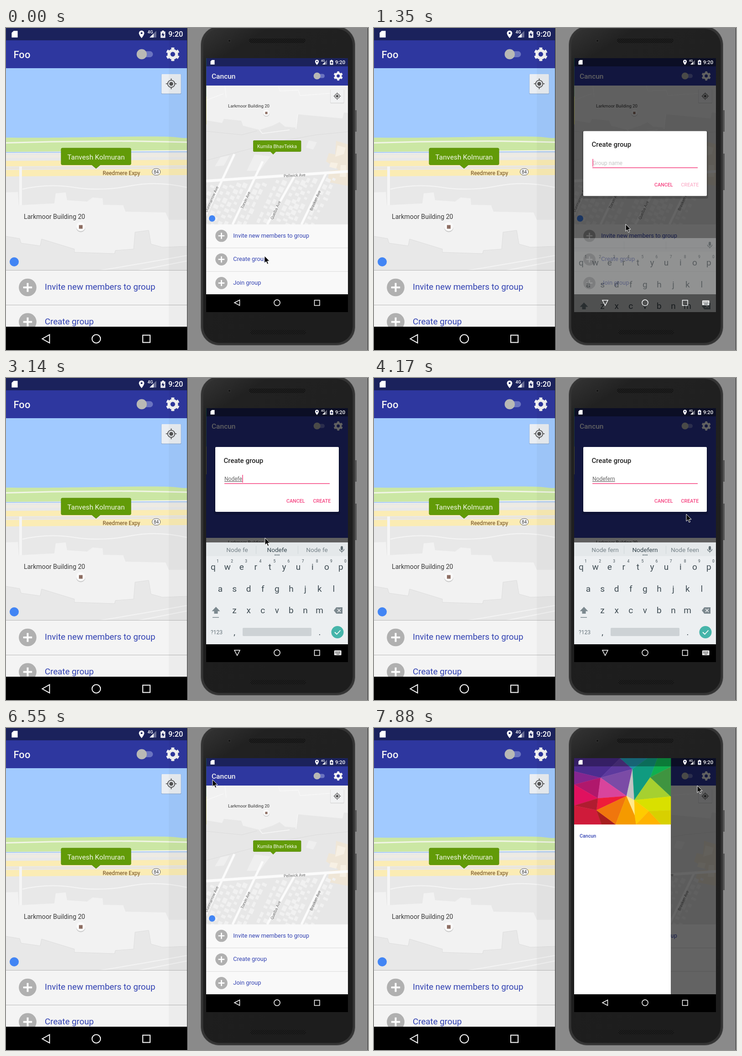
Animation of 794 by 705 pixels, one loop 8000 ms. Source, as an HTML page:

```html
<!DOCTYPE html>
<html lang="en">
<head>
<meta charset="utf-8">
<title>Create group demo</title>
<style>
html, body { margin: 0; width: 100%; height: 100%; overflow: hidden; background: #8a8a8a; }
svg { display: block; font-family: Roboto, sans-serif; }
.mid { text-anchor: middle; }
.medium { font-weight: 500; }
.link { fill: #3242b2; }
.line { fill: none; stroke: #fff; }
.street { fill: #6a6a6a; font-size: 8.6px; text-anchor: middle; }
</style>
</head>
<body>
<svg width="794" height="705" viewBox="0 0 794 705">
<defs>
  <clipPath id="screen"><rect x="439" y="66" width="311" height="556"/></clipPath>
  <clipPath id="mapArea"><rect x="439" y="126" width="311" height="304"/></clipPath>
  <clipPath id="strip"><rect x="439" y="350" width="311" height="12"/></clipPath>
  <clipPath id="leftMap"><rect y="88" width="397" height="443"/></clipPath>
  <pattern id="mesh" width="4" height="4" patternUnits="userSpaceOnUse">
    <rect width="4" height="4" fill="#0c0c0c"/><path d="M0 0h2v2H0zM2 2h2v2H2z" fill="#262626"/>
  </pattern>
  <linearGradient id="body" x2=".3" y2="1">
    <stop stop-color="#343434"/><stop offset=".12" stop-color="#212121"/><stop offset="1" stop-color="#1d1d1d"/>
  </linearGradient>
  <!-- Both icon groups are placed relative to the right end of the status bar. -->
  <g id="status" fill="#fff">
    <path d="M-68-5.5a4 4 0 0 1 4 4q0 2.5-4 7.5q-4-5-4-7.5a4 4 0 0 1 4-4z"/>
    <circle cx="-68" cy="-1.5" r="1.4" fill="#1b225c"/>
    <text x="-59" y="-1" font-size="6.5" class="medium">4G</text>
    <path d="M-46-5V5h-10z" opacity=".35"/><path d="M-50-1V5h-6z"/>
    <path d="M-39.5-4h2v-1.300h3V-4h2V5.500h-7z"/>
    <path d="M-35.500-3l-2.800 4.500h2v3l2.800-4.500h-2z" fill="#1b225c"/>
    <text x="-28" y="4" font-size="11.200" class="medium">9:20</text>
  </g>
  <path id="sd" d="M-1.500-5H4.500V5h-9V-2z" fill="#fff"/>
  <g id="tools">
    <rect x="-73" y="25.500" width="22" height="9" rx="4.500" fill="#6b74c0"/>
    <circle cx="-67.800" cy="30" r="7.600" fill="#b9b9b5"/>
    <g transform="translate(-21.300 30)" fill="none" stroke="#f4f4f4">
      <circle r="5.700" stroke-width="4.400"/>
      <circle r="8.600" stroke-width="3.200" pathLength="6" stroke-dasharray=".5" stroke-dashoffset="-.25"/>
    </g>
    <g transform="translate(-23.600 74.200)">
      <rect x="-15" y="-14.500" width="30" height="30" rx="1" fill="#777" opacity=".3"/>
      <rect x="-14.500" y="-14.500" width="29" height="29" rx="1" fill="#f6f7f8" opacity=".88"/>
      <circle r="5.300" fill="none" stroke="#555" stroke-width="1.200"/>
      <circle r="2.900" fill="#555"/>
      <path d="M0-8v3M0 8v-3M-8 0h3M8 0h-3" stroke="#555" stroke-width="1.200"/>
    </g>
  </g>
  <g id="map">
    <rect x="439" y="126" width="312" height="304" fill="#e7e7e7"/>
    <path d="M439 126H751V186L741 185 738 198 640 189 635 218 612 216 600 206 584 214 556 223 520 214 516 203 478 199 474 208 439 202z" fill="#f1f1f1"/>
    <path d="M480 126l3 26M597 126l4 12 40-2 4 12 66-5M439 158l38-14M556 223l6 8 60-8M640 189l-4 32" fill="none" stroke="#f8f8f8" stroke-width="1.500"/>
    <path d="M439 290L590 250 680 234 751 227M439 226l78 8 34-9" fill="none" stroke="#dcdcdc"/>
    <path d="M545 277l35 4-23 31-29 1zM470 283l20-4-12 22-20 2zM664 246l18 4-8 16-16-4z" fill="#efefef"/>
    <path d="M724 247l27 8V346l-46-9 4-24 20-3-27-18 6-18 14 3z" fill="#efe6d7"/>
    <path d="M727 257l18 5-4 14-19 6zM712 294l16 2-4 12-15-4zM734 300h12v26h-14z" fill="#f7f0e4"/>
    <g id="houses" fill="#f1f1f1"></g>
    <path d="M501 276L428 430M563 292L497 430M634 322L573 430M702 318L648 430" stroke="#fbfbfb" stroke-width="5"/>
    <path d="M439 335L751 314" stroke="#fbfbfb" stroke-width="6"/>
    <text class="street" x="633" y="325.500" transform="rotate(-3 633 325)">Pellwick Ave</text>
    <g id="streets"></g>
    <text x="487" y="174" font-size="9.600" fill="#333">Larkmoor Building 20</text>
    <circle cx="571" cy="187" r="7" fill="#c9c9c9"/><circle cx="571" cy="185.500" r="7" fill="#fafafa"/>
    <rect x="568.500" y="183.500" width="5" height="5" fill="#8d6e63"/>
    <circle cx="452" cy="417" r="7" fill="#4285f4"/>
    <path d="M542.500 248q0-1.500 1.500-1.500H645.500q1.500 0 1.500 1.500V269q0 1.500-1.500 1.500H592L586 276.500 580 270.500H544q-1.500 0-1.500-1.500z" fill="#629b08" stroke="#568a08" stroke-width=".8"/>
    <text class="mid" x="594.500" y="262.500" font-size="10.700" fill="#f3f8ea">Kumila BhavTekka</text>
  </g>
</defs>

<!-- Left device -->
<rect width="397" height="27" fill="#1b225c"/>
<rect y="27" width="397" height="61" fill="#2e379f"/>
<text class="medium" x="16.500" y="66" font-size="22" fill="#f4f4f4">Foo</text>
<g clip-path="url(#leftMap)">
  <rect y="88" width="397" height="443" fill="#e8e8e8"/>
  <rect y="88" width="397" height="160" fill="#a1caff"/>
  <path d="M0 240C120 241 210 238 300 237.500S370 241 397 241V268L0 272z" fill="#cbe7a4"/>
  <path d="M0 251.500L100 249 270 247.500 397 250" fill="none" stroke="#f1f5e6" stroke-width="3"/>
  <path d="M0 273L397 269" stroke="#f3f3f3" stroke-width="3.500"/>
  <path d="M0 272.500L397 271" stroke="#8fbdf5" stroke-width="1.500"/>
  <path d="M0 281L397 279" stroke="#eeebe3" stroke-width="7"/>
  <path d="M0 297L397 294.500" stroke="#fbecb4" stroke-width="12"/>
  <path d="M0 318L397 315" stroke="#fbecb4" stroke-width="14"/>
  <path d="M0 307L397 304.500" stroke="#ece6d6" stroke-width="3"/>
  <path d="M32 303V390" stroke="#f5f5f5" stroke-width="6"/>
  <path d="M36 353Q90 340 150 349T270 346 397 349" fill="none" stroke="#f5f5f5" stroke-width="2"/>
  <path d="M0 360L26 359 28 388 106 384 109 362 131 360 134 377 178 380 190 371 212 373 213 387 257 388 262 402 350 404 357 420H397V478L343 480 318 473 313 443 283 447 280 484 240 487 238 494 150 491V484L78 462 75 477 33 471 30 461 0 456z" fill="#f2f2f2"/>
  <path d="M0 456L30 461 33 471 75 477 78 462 150 484V491L238 494 240 487 280 484 283 447 313 443 318 473 343 480 397 478" fill="none" stroke="#dedede"/>
  <path d="M205 531L300 515 397 498M290 531l107-21" fill="none" stroke="#f4f4f4" stroke-width="2"/>
  <text x="212" y="321.500" font-size="12" fill="#6f4a1c">Reedmere Expy</text>
  <rect x="320.500" y="308" width="18" height="14" rx="7" fill="#fff" stroke="#555"/>
  <text class="mid" x="329.500" y="319" font-size="10" fill="#333">84</text>
  <text x="39" y="417.500" font-size="14.200" fill="#3a3a3a">Larkmoor Building 20</text>
  <circle cx="164" cy="437" r="10" fill="#c9c9c9"/><circle cx="164" cy="435" r="10" fill="#fafafa"/>
  <rect x="160" y="431.500" width="8" height="8" fill="#8d6e63"/>
  <circle cx="18" cy="512" r="10" fill="#4285f4"/>
  <path d="M121 265.500q0-2.500 2.500-2.500H271.500q2.500 0 2.500 2.500V297q0 2.500-2.500 2.500H207L197.500 307.500 188 299.500H123.500q-2.500 0-2.500-2.500z" fill="#629b08" stroke="#568a08"/>
  <text class="mid" x="197.500" y="287.500" font-size="15.300" fill="#f3f8ea">Tanvesh Kolmuran</text>
</g>
<use href="#sd" transform="translate(19 13.500) scale(1.465)"/>
<use href="#status" transform="translate(397 13.500) scale(1.465)"/>
<use href="#tools" transform="translate(397 13.500) scale(1.465)"/>
<rect y="530" width="397" height="124" fill="#f4f4f4"/>
<path d="M0 530.500H397M0 606.500H397" stroke="#b8b8b8"/>
<g id="leftRows"></g>
<path d="M357 27H397V654H357zM371 27H397V654H371zM382 27H397V654H382zM391 27H397V654H391z" opacity=".03"/>
<rect y="654" width="397" height="51"/>
<g class="line" stroke-width="2">
  <path d="M79.500 680.500L95.500 671.500V689.500z"/><circle cx="198" cy="680.500" r="9.300"/>
  <rect x="300" y="672.500" width="16" height="16"/>
</g>

<!-- Right device -->
<rect x="397" width="397" height="705" fill="#8a8a8a"/>
<path d="M397.500 0V705M793.500 0V705" stroke="#333"/>
<path d="M764 180h5v47h-5zM764 275h5v80h-5z" fill="#525252"/>
<rect x="427.500" y="-3.500" width="338" height="698" rx="40" fill="#343434" stroke="#555"/>
<rect x="432.500" y="1.500" width="328" height="688" rx="36" fill="url(#body)"/>
<rect x="533" y="23" width="124" height="10" rx="5" fill="url(#mesh)"/>
<rect x="536" y="661" width="122" height="10" rx="5" fill="url(#mesh)"/>
<circle cx="490" cy="28" r="4" fill="#2c2c2c"/><circle cx="490" cy="28" r="1.800" fill="#0e0e0e"/>
<g clip-path="url(#screen)">
  <rect x="439" y="66" width="312" height="18" fill="#1b225c"/>
  <rect x="439" y="84" width="312" height="42" fill="#2e379f"/>
  <text class="medium" x="451" y="111" font-size="15.500" fill="#f4f4f4">Cancun</text>
  <use href="#map" clip-path="url(#mapArea)"/>
  <use href="#tools" x="750" y="75"/>
  <rect x="439" y="430" width="312" height="153" fill="#f9f9f9"/>
  <path d="M439 481.500H751M439 533H751" stroke="#dadada"/>
  <g id="rightRows"></g>
  <g id="resized">
    <rect x="439" y="126" width="312" height="224" fill="#2e379f"/>
    <g clip-path="url(#strip)"><use href="#map" y="189"/></g>
  </g>
  <rect id="dim" x="439" y="66" width="312" height="517"/>
  <g id="dialog">
    <rect x="456" y="0" width="277" height="148" rx="4" opacity=".15"/>
    <rect x="459" width="271" height="142" rx="2" fill="#fff"/>
    <text class="medium" x="477.500" y="34.500" font-size="15" fill="#212121">Create group</text>
    <text id="hint" x="479.500" y="74" font-size="12" fill="#c4c4c4">Group name</text>
    <text id="input" x="479" y="74" font-size="12" fill="#666"></text>
    <rect x="479" y="79.500" width="231" height="1.500" fill="#f5417f"/>
    <rect id="caret" y="61" width="1.500" height="17" fill="#f5417f"/>
    <g class="medium" font-size="10.700" fill="#f5417f">
      <text x="615" y="121.500">CANCEL</text><text id="create" x="673.500" y="121.500">CREATE</text>
    </g>
  </g>
  <g id="drawer">
    <rect x="439" y="66" width="212" height="517" fill="#fff"/>
    <g id="art"></g>
    <rect x="439" y="66" width="212" height="18" opacity=".3"/>
    <text class="medium link" x="451" y="239.500" font-size="10.700">Cancun</text>
  </g>
  <rect x="439" y="583" width="312" height="39"/>
  <g class="line" stroke-width="1.500">
    <path id="back" d="M-6 0L5.500-6V6z"/><circle cx="594.500" cy="601.500" r="6.500"/>
    <rect x="676.500" y="596" width="11.500" height="11.500"/>
  </g>
  <g id="imeIcon">
    <rect x="720" y="596.500" width="15.500" height="10.500" rx="1" fill="#fff"/>
    <path d="M722 599.500h12M722 602h12" stroke="#000" stroke-width="1.300" stroke-dasharray="1.400 1"/>
    <path d="M724.500 604.800h7" stroke="#000"/>
  </g>
  <g id="keyboard">
    <rect x="439" y="360" width="312" height="223" fill="#eceff1"/>
    <rect x="439" y="360" width="312" height="30" fill="#e4e8ea"/>
    <path d="M548.500 367v18M640.500 367v18" stroke="#cfd5d8"/>
    <g id="words" class="mid" font-size="13.600" fill="#78848a">
      <text x="507" y="381"></text><text x="594.500" y="381" fill="#37474f"></text><text x="682" y="381"></text>
    </g>
    <path id="dots" d="M589.500 386.500h2v2h-2zM593.500 386.500h2v2h-2zM597.500 386.500h2v2h-2z" fill="#37474f"/>
    <rect x="734" y="368" width="5" height="9" rx="2.500" fill="#5f6c72"/>
    <path d="M731.500 374.500a5 5 0 0 0 10 0M736.500 379.500v3" fill="none" stroke="#5f6c72" stroke-width="1.300"/>
    <g id="keys" class="mid" font-size="19" fill="#3f4c53"></g>
    <path d="M460.500 501l9 9.500h-5v5.500h-8v-5.500h-5zM453 523.500h14v1.500h-14z" fill="#7c898f"/>
    <path d="M719 509l5.500-7H738V516H724.500z" fill="#7c898f"/>
    <path d="M727 505.500l7 7M734 505.500l-7 7" stroke="#eceff1" stroke-width="1.500"/>
    <text class="mid" x="462" y="560.500" font-size="12" fill="#66747b">?123</text>
    <rect x="519" y="547" width="151" height="18" rx="2" fill="#cdd2d5"/>
    <circle cx="727" cy="556.500" r="13.500" fill="#46b5aa"/>
    <path d="M721 556.500l4.500 4.500 8-8.500" class="line" stroke-width="1.800"/>
  </g>
  <use href="#sd" x="453" y="75"/>
  <use href="#status" x="750" y="75"/>
</g>
<path id="cursor" d="M0 0V15.500L3.600 12.200 6 18 8.600 17 6.200 11.300H11z" stroke="#fff"/>
</svg>
<script>
const $ = id => document.getElementById(id);
const LOOP = 8000, STEP = 148.5, WORD = 'Nodefern';

function listRow(x, y, scale, label) {
  return `<g transform="translate(${x} ${y}) scale(${scale})">
    <circle r="13.300" fill="#b0b0b0"/>
    <path d="M-6.700 0H6.700M0-6.700V6.700" stroke="#fff" stroke-width="2.700"/>
    <text class="link" x="25.800" y="3.700" font-size="12.900">${label}</text></g>`;
}
const labels = ['Invite new members to group', 'Create group', 'Join group'];
$('rightRows').innerHTML = labels.map((s, i) => listRow(472.5, 455 + i * 51.7, 1, s)).join('');
$('leftRows').innerHTML = labels.slice(0, 2).map((s, i) => listRow(47.5, 568 + i * 75.5, 1.455, s)).join('');

const streets = [['Dunmarrow Ave', 454, 376], ['Torvin Ave', 528, 378], ['Quelba Ave', 594, 400], ['Brasken Ave', 681, 379]];
$('streets').innerHTML = streets.map(([name, x, y]) =>
  `<text class="street" transform="translate(${x} ${y}) rotate(-66)">${name}</text>`).join('');

let seed = 7;
const random = () => (seed = seed * 16807 % 2147483647) / 2147483647;
let houses = '';
for (const x of [474, 546, 632, 700])
  for (const side of [-28, -14, 14, 28])
    for (let d = 14; d < 115; d += 14) {
      const w = 6 + random() * 5, h = 5 + random() * 7;
      const y = 335 - (x - 439) * .0675 + d;
      houses += `<rect width="${w}" height="${h}" transform="translate(${x - d * .478 + side - 4} ${y - 4}) rotate(25)"/>`;
    }
$('houses').innerHTML = houses;

let keys = '';
['qwertyuiop', 'asdfghjkl', 'zxcvbnm'].forEach((row, r) => [...row].forEach((c, i) => {
  const x = [454.5, 470, 501][r] + i * 31.1;
  keys += `<text x="${x}" y="${420 + r * 47.5}">${c}</text>`;
  if (!r) keys += `<text x="${x + 10}" y="404" font-size="8.500">${(i + 1) % 10}</text>`;
}));
$('keys').innerHTML = keys + '<text x="501" y="563">,</text><text x="688" y="563">.</text>';

// Low-poly drawer header: lettered corners, then faces as corner letters and a colour.
const corners = `439,66 540,66 567,90 497,109 439,95 554,149 439,124 491,154 439,170 488,180 439,211 499,211 530,211
  572,191 575,211 571,158 600,66 622,66 606,108 651,66 651,85 651,150 603,182 630,211 651,211 651,180`.split(/\s+/);
const faces = `abde#4c2d90 bcd#5d3a9e cdf#7b4ba6 edg#84268f gdh#b0186c dfh#d9449c ghi#e0115f hfj#ee1c3a
  ihj#b01c30 ijlk#cf1b3a jml#a81e1e jfm#f0760d fnom#f59a00 cpf#c4c4c4 fpn#ffe98a bqc#1f8fa8
  cqrsp#109b80 rtus#10b050 svp#a6d030 uvs#3f9440 pvzw#d9e000 pwon#ffcb00 wxo#ffb300 zyxw#d8d000`;
$('art').innerHTML = faces.split(/\s+/).map(face => {
  const [names, color] = face.split('#');
  const points = [...names].map(c => corners[c.charCodeAt(0) - 97]).join(' ');
  return `<polygon points="${points}" fill="#${color}" stroke="#${color}" stroke-width=".5"/>`;
}).join('');

// Value at step k on a polyline of [step, value] keys.
function track(k, keys) {
  const i = keys.findIndex(key => key[0] > k);
  if (i < 0) return keys[keys.length - 1][1];
  if (!i) return keys[0][1];
  const [k0, v0] = keys[i - 1], [k1, v1] = keys[i];
  return v0 + (v1 - v0) * (k - k0) / (k1 - k0);
}
const path = [[2, 567, 499], [4, 536, 509], [7, 536, 509], [11, 568, 350], [25, 568, 350], [28, 685, 298],
  [31, 682, 267], [37, 682, 267], [44, 453, 113], [46, 445, 110], [47, 445, 110], [48, 442, 109],
  [49, 442, 109], [53, 709, 126]];
const pathX = path.map(p => [p[0], p[1]]), pathY = path.map(p => [p[0], p[2]]);

const show = (id, on) => $(id).setAttribute('visibility', on ? 'visible' : 'hidden');
const place = (id, x, y) => $(id).setAttribute('transform', `translate(${x} ${y})`);
const fade = (id, value) => $(id).setAttribute('opacity', value);

function draw(k) {
  const x = track(k, pathX), y = track(k, pathY);
  place('cursor', x, y);

  const edge = k < 50 ? 439 : Math.min(651, x);
  place('drawer', edge - 651, 0);
  fade('dim', k < 50
    ? track(k, [[6, 0], [7, .38], [8, .6], [33, .6], [34, .55], [35, .38], [36, 0]])
    : .6 * (edge - 439) / 212);

  place('dialog', 0, track(k, [[8, 263], [11, 151], [34, 151], [35, 263]]));
  fade('dialog', track(k, [[6, 0], [7, .97], [8, 1], [33, 1], [34, .9], [35, .3], [36, 0]]));
  place('keyboard', 0, track(k, [[8, 150], [11, 0], [34, 0], [35, 11.5]]));
  fade('keyboard', track(k, [[8, 0], [11, 1], [34, 1], [35, .6], [36, 0]]));
  show('resized', k >= 10 && k <= 34);

  const ime = k >= 7 && k <= 34;
  show('imeIcon', ime);
  $('back').setAttribute('transform', `translate(507 601.5) rotate(${ime ? -90 : 0})`);

  const count = k < 15 ? 0 : Math.min(8, 1 + Math.floor((k - 15) * .9));
  const typed = WORD.slice(0, count);
  $('input').textContent = typed;
  $('input').setAttribute('text-decoration', count > 1 ? 'underline' : 'none');
  show('hint', !count);
  fade('create', count ? 1 : .4);
  $('caret').setAttribute('x', 479.3 + (count && $('input').getComputedTextLength()));
  show('caret', !(k === 13 || k === 14 || (k >= 26 && k <= 28) || k >= 31));

  const split = end => count > 4 ? typed.slice(0, 4) + ' ' + end.slice(0, count - 4) : typed + end[0];
  const words = count > 1 ? [split('fern'), typed, split('feen')] : ['', '', ''];
  [...$('words').children].forEach((text, i) => text.textContent = words[i]);
  show('dots', count > 1);
}

let last = -1;
function frame(now) {
  const k = Math.floor(now % LOOP / STEP);
  if (k !== last) draw(last = k);
  requestAnimationFrame(frame);
}
draw(0);
requestAnimationFrame(frame);
</script>
</body>
</html>
```
